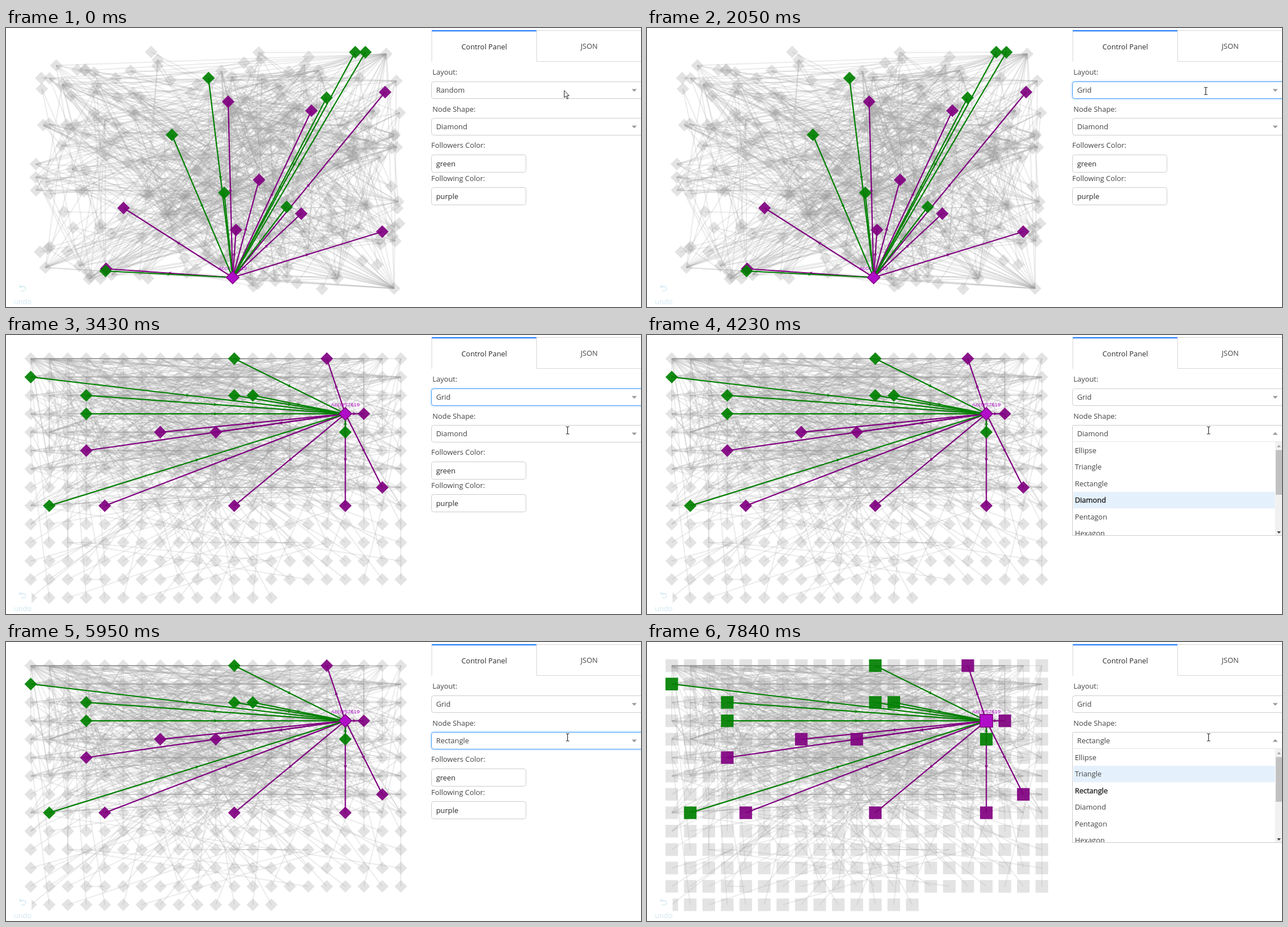
Recreate the animation shown at these times as an HTML page. Size 1129 px wide and 496 px high, loop 7.99 s.

```html
<!DOCTYPE html>
<html lang="en">
<head>
<meta charset="utf-8">
<title>Network control panel</title>
<style>
html, body { margin: 0; width: 100%; height: 100%; overflow: hidden; background: #fff; }
svg { display: block; width: 1129px; height: 496px; }
text { font-family: "Open Sans", sans-serif; font-size: 12.9px; fill: #444; white-space: pre; }
.tag { font: 9.7px "Liberation Sans", Arial, sans-serif; fill: #b10dc9; }
.mid { text-anchor: middle; }
.dark { fill: #2b2b2b; }
.picked { fill: #222; stroke: #222; stroke-width: .4px; }
.undo text { fill: #cfe8f3; }
.box { fill: #fff; stroke: #ccc; }
</style>
</head>
<body>
<svg viewBox="0 0 1129 496">
  <g id="graph"></g>
  <g class="undo">
    <rect y="450" width="45.5" height="46" fill="#fff"/>
    <path d="M25 459.5h6a3.9 3.9 0 0 1 0 7.8h-4.5M24.5 456.5v4.2h4.2" fill="none" stroke="#cfe8f3" stroke-width="1.3"/>
    <text class="mid" x="29.8" y="491">undo</text>
  </g>
  <g id="panel"></g>
  <g id="cursor"></g>
</svg>
<script>
const LOOP = 7990, COLS = 21, COUNT = 287, HALF = 11.2, BLINK = 530;
const $ = id => document.getElementById(id);

let seed = 4217;
function rand() {
  seed = (seed + 0x6D2B79F5) | 0;
  let v = Math.imul(seed ^ (seed >>> 15), 1 | seed);
  v = (v + Math.imul(v ^ (v >>> 7), 61 | v)) ^ v;
  return ((v ^ (v >>> 14)) >>> 0) / 4294967296;
}
const between = (a, b) => a + (b - a) * rand();

// Selected user and neighbours: grid column, grid row, scattered x, y
const hub = 17 + 3 * COLS;
const followers = [
  [11, 0, 360, 89], [0, 1, 295, 190], [3, 2, 388, 293], [11, 2, 499, 318],
  [12, 2, 570, 124], [3, 3, 621, 43], [17, 4, 639, 43], [1, 8, 177, 432]
];
const following = [
  [16, 0, 395, 131], [18, 3, 209, 320], [7, 4, 450, 270], [10, 4, 525, 330], [3, 5, 543, 147],
  [19, 7, 674, 114], [4, 8, 669, 362], [11, 8, 409, 359], [17, 8, 178, 428]
];
const busy = [[690, 463], [676, 46], [100, 100], [694, 94]];

const gridAt = Array.from({ length: COUNT }, (_, i) =>
  [44 + 32.9 * (i % COLS), 42 + 32.7 * Math.floor(i / COLS)]);

// Every fifth user lies on the rim, the others fill the inside
function scatter(i) {
  if (i < busy.length) return busy[i];
  if (i % 5) return [between(95, 670), between(72, 440)];
  return [
    () => [between(80, 600), between(42, 85)],
    () => [between(680, 700), between(150, 385)],
    () => [between(110, 600), between(436, 467)],
    () => [between(48, 85), between(75, 452)]
  ][i / 5 % 4]();
}

const randomAt = gridAt.map((_, i) => scatter(i));
randomAt[hub] = [403, 443.5];
const links = [];
for (const [list, color] of [[following, 'purple'], [followers, 'green']])
  for (const [c, r, x, y] of list) {
    const id = c + r * COLS;
    randomAt[id] = [x, y];
    links.push({ id, color });
  }
const lit = new Set([hub, ...links.map(l => l.id)]);

// Early users have the most connections
const edges = [];
for (let i = 1; i < COUNT; i++) edges.push([i, Math.floor(i * rand() ** 1.5)]);
for (let i = 0; i < 480; i++)
  edges.push([Math.floor(190 * rand()), Math.floor(170 * rand() ** 1.4)]);

const n = v => v.toFixed(1);

function nodePath([x, y], square) {
  const h = HALF;
  return square ? `M${n(x - h)} ${n(y - h)}h${2 * h}v${2 * h}h${-2 * h}z`
    : `M${n(x)} ${n(y - h)}l${h} ${h}l${-h} ${h}l${-h} ${-h}z`;
}

function link(from, to, color) {
  const [x, y] = from, [u, v] = to;
  const turn = Math.atan2(v - y, u - x) * 180 / Math.PI;
  return `<path d="M${n(x)} ${n(y)}L${n(u)} ${n(v)}" stroke="${color}" stroke-width="2.2"/>
    <path d="M-3.5-3L3.5 0L-3.5 3L-1.5 0z" fill="${color}" transform="translate(${n((x + u) / 2)} ${n((y + v) / 2)}) rotate(${n(turn)})"/>`;
}

function graph(at, square) {
  const center = at[hub];
  let s = '<g fill="none" stroke="#999" stroke-opacity=".2" stroke-width="2">';
  for (const [a, b] of edges)
    s += `<path d="M${at[a].map(n)}L${at[b].map(n)}"/>`;
  s += '</g><g fill="#999" fill-opacity=".28">';
  for (let i = 0; i < COUNT; i++)
    if (!lit.has(i)) s += `<path d="${nodePath(at[i], square)}"/>`;
  s += `</g><text class="tag mid" x="${n(center[0])}" y="${n(center[1] - 13.5)}">Acct#57619</text>`;
  for (const { id, color } of links)
    s += color === 'green' ? link(at[id], center, color) : link(center, at[id], color);
  for (const { id, color } of links)
    s += `<path d="${nodePath(at[id], square)}" fill="${color}" fill-opacity=".92"/>`;
  return s + `<path d="${nodePath(center, square)}" fill="#b10dc9" stroke="purple" stroke-width="1.6"/>`;
}

const scenes = [graph(randomAt, false), graph(gridAt, false), graph(gridAt, true)];

const text = (x, y, str, cls = '') => `<text x="${x}" y="${y}" class="${cls}">${str}</text>`;
const input = (y, str) =>
  `<rect class="box" x="756.5" y="${y}" width="168" height="31" rx="4"/>` + text(764.7, y + 20.5, str, 'dark');

const tabs = `
  <path d="M757 5V60M943.5 5V59.5H1129M943 4.5H1129" fill="none" stroke="#d6d6d6"/>
  <path d="M757 5H943" stroke="#1975fa" stroke-width="2"/>
  ${text(850.3, 37.5, 'Control Panel', 'mid dark')}${text(1036.8, 37, 'JSON', 'mid')}`;
const fields = text(758.3, 83, 'Layout:') + text(758.3, 148.5, 'Node Shape:') +
  text(756, 213.3, 'Followers Color:') + input(225.5, 'green') +
  text(756, 272.3, 'Following Color:') + input(283.5, 'purple');

function select(y, value, open, focus, caret) {
  const d = open ? -1 : 1, mid = y + 15;
  let s = '';
  if (focus) s += `<rect x="755" y="${y - 1.5}" width="390" height="33" rx="5" fill="none" stroke="#007eff" stroke-opacity=".1" stroke-width="3"/>`;
  s += `<rect class="box" x="756.5" y="${y}" width="386" height="30" rx="${open ? 2 : 4}"${focus ? ' style="stroke:#3b97f5"' : ''}/>`;
  s += `<path d="M1112.5 ${mid - 2 * d}h9l-4.5 ${4.8 * d}z" fill="#999"/>`;
  s += text(764.7, y + 19.5, value);
  if (caret) s += `<path d="M766.5 ${y + 6.5}v17" stroke="#000"/>`;
  return s;
}

function menu(top, items, picked, hot) {
  const step = 29.4;
  let s = `<clipPath id="clip"><rect x="757" y="${top}" width="372" height="166"/></clipPath>
    <rect class="box" x="756.5" y="${top - .5}" width="386" height="167"/>
    <path d="M757 ${top - .5}H1129" stroke="#e6e6e6"/><g clip-path="url(#clip)">
    <rect x="758" y="${top + hot * step + .6}" width="358.5" height="${step}" fill="#e4f1fd"/>`;
  items.forEach((item, i) => {
    s += text(760.7, n(top + 20 + i * step), item, i === picked ? 'picked' : '');
  });
  return s + `<rect x="1116.5" y="${top}" width="14" height="166" fill="#f1f1f1"/>
    <rect x="1118" y="${top + 14.5}" width="11" height="79.5" fill="#c1c1c1"/>
    <path d="M1120 ${top + 9.5}h7l-3.5 -4z" fill="#a3a3a3"/>
    <path d="M1120 ${top + 159}h7l-3.5 4z" fill="#444"/></g>`;
}

const layouts = ['Random', 'Grid', 'Circle', 'Concentric', 'Breadthfirst', 'Cose'];
const shapes = ['Ellipse', 'Triangle', 'Rectangle', 'Diamond', 'Pentagon', 'Hexagon'];
const within = (t, a, b) => t >= a && t < b;
const blink = age => Math.floor(age / BLINK) % 2 === 0;

function panel(t) {
  const layout = t < 2050 ? 0 : 1, shape = t < 5950 ? 3 : 2;
  const openLayout = within(t, 430, 2050);
  const openShape = within(t, 3700, 5950) || t >= 6950;
  let s = tabs + fields +
    select(95.5, layouts[layout], openLayout, within(t, 2050, 3700), openLayout && blink(t - 420)) +
    select(160.5, shapes[shape], openShape, within(t, 5950, 6950), openShape && blink(t - (t < 6950 ? 3700 : 6880)));
  if (openLayout) s += menu(126, layouts, layout, t < 1760 ? 0 : 1);
  if (openShape) s += menu(190, shapes, shape, t < 4600 ? 3 : t < 7840 ? 2 : 1);
  return s;
}

// start time, pointer kind, x, y
const moves = [
  [0, 'arrow', 992, 110.5], [550, 'beam', 993, 112], [3030, 'arrow', 990, 144],
  [3170, 'arrow', 992, 158], [3310, 'arrow', 997, 168], [3430, 'beam', 998, 169.5]
];
const pointers = {
  arrow: '<path d="M.5.5V13.2L3.4 10.5L5.6 15.6L7.6 14.7L5.4 9.8H9.2z" fill="#fff" stroke="#222"/>',
  beam: '<path d="M-2.5 -6.5H-.7L.5 -5.8L1.7 -6.5H3.5M-2.5 6.5H-.7L.5 5.8L1.7 6.5H3.5M.5 -6V6" fill="none" stroke="#222" stroke-width="1.1"/>'
};
function cursor(t) {
  const [, kind, x, y] = moves.filter(m => m[0] <= t).pop();
  return `<g transform="translate(${x} ${y})">${pointers[kind]}</g>`;
}

const shown = {};
function put(id, html) {
  if (shown[id] !== html) $(id).innerHTML = shown[id] = html;
}

function draw(t) {
  put('graph', scenes[t < 2330 ? 0 : t < 6330 ? 1 : 2]);
  put('panel', panel(t));
  put('cursor', cursor(t));
}

function tick() {
  draw(performance.now() % LOOP);
  requestAnimationFrame(tick);
}
tick();
</script>
</body>
</html>
```
